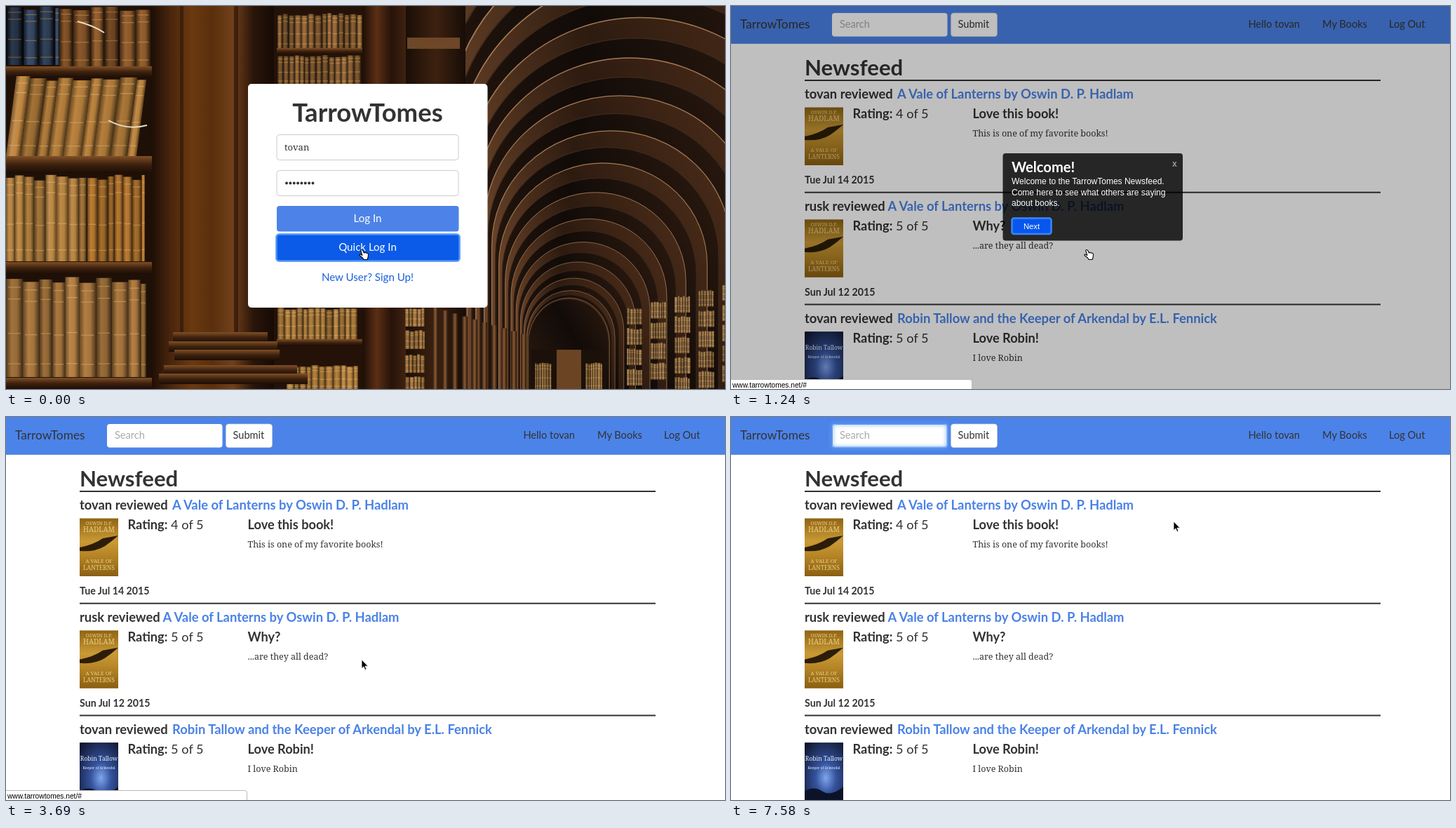
Write an HTML page with a canvas that moves like this. It is 1025 px wide and 546 px high and loops after 8 s.

```html
<!DOCTYPE html>
<html lang="en">
<head>
<meta charset="utf-8">
<title>TarrowTomes</title>
<style>
html, body { margin: 0; width: 100%; height: 100%; overflow: hidden; background: #fff; }
canvas, svg { position: absolute; inset: 0; width: 100%; height: 100%; display: block; }
svg { font-family: Lato, sans-serif; fill: #333; }
.serif { font: 12.5px "Noto Serif", serif; }
.sans { font: 12px "Liberation Sans", sans-serif; }
.nav { font-size: 14.6px; }
.button { font-size: 15.1px; text-anchor: middle; fill: #fff; }
.heading { font-size: 18.4px; font-weight: 700; }
.label { font-size: 18.2px; }
.bold { font-weight: 700; }
.link { fill: #4a82e6; }
.rule { stroke: #333; stroke-width: 2; }
.field { fill: #fff; stroke: #ccc; }
.cover { font-family: "Noto Serif", serif; text-anchor: middle; fill: #e9cf83; }

/* Timeline: 8 s loop, every change is a hard step */
.timed { animation: 8s step-end infinite; }
#library, #login { animation-name: login; }
#page { animation-name: page; }
#hello { animation-name: hello; }
#feed { animation-name: feed; }
#shade { animation-name: shade; }
#welcome { animation-name: welcome; }
#searchSpot { animation-name: searchSpot; }
#searchTip { animation-name: searchTip; }
#booksSpot { animation-name: booksSpot; }
#status { animation-name: status; }
#focus { animation-name: focus; }
#caret { animation-name: caret; }
#pointer { animation-name: move; }
#hand { animation-name: hand; }
#arrow { animation-name: arrow; }
#beam { animation-name: beam; }
@keyframes login { 0% { opacity: 1 } 1.875%, 100% { opacity: 0 } }
@keyframes page { 0% { opacity: 0 } 8.5%, 100% { opacity: 1 } }
@keyframes hello { 0% { opacity: 1 } 10.375%, 100% { opacity: 0 } }
@keyframes feed { 0% { opacity: 0 } 10.375%, 100% { opacity: 1 } }
@keyframes shade { 0% { opacity: 0 } 10.375% { opacity: .3 } 12.25% { opacity: .75 } 15.5% { opacity: 1 } 46.125%, 100% { opacity: 0 } }
@keyframes welcome { 0% { opacity: 0 } 12.25% { opacity: .6 } 15.5% { opacity: 1 } 29.375% { opacity: .6 } 31.25% { opacity: .1 } 33.125%, 100% { opacity: 0 } }
@keyframes searchSpot { 0% { opacity: 0 } 31.25% { opacity: 1 } 40.5%, 100% { opacity: 0 } }
@keyframes searchTip { 0% { opacity: 0 } 31.25% { opacity: .3 } 33.125% { opacity: .9 } 35% { opacity: 1 } 36.875% { opacity: .6 } 38.625% { opacity: .07 } 40.5%, 100% { opacity: 0 } }
@keyframes booksSpot { 0% { opacity: 0 } 40.5% { opacity: 1 } 46.125%, 100% { opacity: 0 } }
@keyframes status { 0% { opacity: 0 } 8.5% { opacity: 1 } 49.875%, 100% { opacity: 0 } }
@keyframes focus { 0% { opacity: 0 } 76.125% { opacity: .5 } 78%, 100% { opacity: 1 } }
@keyframes caret { 0% { opacity: 0 } 78% { opacity: 1 } 81.75% { opacity: 0 } 89.125% { opacity: 1 } 94.75%, 100% { opacity: 0 } }
@keyframes hand { 0% { opacity: 1 } 46.125%, 100% { opacity: 0 } }
@keyframes arrow { 0% { opacity: 0 } 46.125% { opacity: 1 } 72.5% { opacity: 0 } 79.875%, 100% { opacity: 1 } }
@keyframes beam { 0% { opacity: 0 } 72.5% { opacity: 1 } 79.875%, 100% { opacity: 0 } }
@keyframes move {
  0% { transform: translate(507px, 346px) }
  49.875% { transform: translate(530px, 345px) }
  51.75% { transform: translate(570px, 338px) }
  53.625% { transform: translate(605px, 328px) }
  55.5% { transform: translate(630px, 316px) }
  57.375% { transform: translate(640px, 308px) }
  59.5% { transform: translate(639px, 304px) }
  61.375% { transform: translate(637px, 302px) }
  65.125% { transform: translate(600px, 270px) }
  67% { transform: translate(500px, 190px) }
  68.875% { transform: translate(390px, 110px) }
  70.75% { transform: translate(310px, 62px) }
  72.5% { transform: translate(264px, 32px) }
  74.375% { transform: translate(258px, 28px) }
  79.875% { transform: translate(440px, 92px) }
  81.75%, 100% { transform: translate(631px, 149px) }
}
</style>
</head>
<body>
<canvas id="library" class="timed" width="1025" height="546"></canvas>
<svg viewBox="0 0 1025 546" preserveAspectRatio="none">
  <defs>
    <linearGradient id="gold" x2="0" y2="1">
      <stop stop-color="#8f6414"/><stop offset=".4" stop-color="#c99a35"/>
      <stop offset=".65" stop-color="#b58425"/><stop offset="1" stop-color="#8a5f12"/>
    </linearGradient>
    <radialGradient id="night" cx=".55" cy=".6" r=".75">
      <stop stop-color="#7fa6ee"/><stop offset=".35" stop-color="#35539d"/><stop offset="1" stop-color="#10162f"/>
    </radialGradient>
    <filter id="blur" x="-10%" y="-50%" width="120%" height="200%"><feGaussianBlur stdDeviation="2.5"/></filter>
  </defs>

  <g id="login" class="timed">
    <rect x="345" y="111" width="341.500" height="319" rx="5" fill="#fff"/>
    <text x="515.500" y="165" font-size="36.500" class="bold" text-anchor="middle">TarrowTomes</text>
    <rect class="field" x="386" y="183.500" width="259" height="36" rx="4"/>
    <rect class="field" x="386" y="234.500" width="259" height="36" rx="4"/>
    <text x="397" y="206" class="serif" style="font-size:13px">tovan</text>
    <path d="M400 252.500h37.600" stroke="#333" stroke-width="4" stroke-linecap="round" stroke-dasharray="0 5.350"/>
    <rect x="386" y="285" width="259.500" height="36.500" rx="4" fill="#4d83e8"/>
    <rect x="385.500" y="325.500" width="261" height="38" rx="4" fill="#0b5be8" stroke="#4f95f3" stroke-width="2.500"/>
    <text class="button" x="515.500" y="308">Log In</text>
    <text class="button" x="515.500" y="349">Quick Log In</text>
    <text class="button" x="515.500" y="392" style="fill:#1c61dc">New User? Sign Up!</text>
  </g>

  <g id="page" class="timed">
    <path d="M0 0H1025V53.500H0Z" fill="#4c83e8"/>
    <path d="M0 53.500H1025" stroke="#3c71d4" stroke-opacity=".6"/>
    <text x="13" y="32" font-size="17.300">TarrowTomes</text>
    <g id="searchBox">
      <rect x="144" y="10" width="164.500" height="33.500" rx="4" fill="#fff"/>
      <text x="155" y="31" class="nav" style="fill:#aaa">Search</text>
    </g>
    <g id="submit">
      <rect x="313.500" y="10" width="66" height="33.500" rx="4" fill="#fff" stroke="#ccc" stroke-width=".7"/>
      <text x="323.500" y="31" class="nav">Submit</text>
    </g>
    <g id="focus" class="timed">
      <rect x="144" y="10" width="164" height="33.500" rx="4" fill="none" stroke="#66a5f2" stroke-width="5" filter="url(#blur)" opacity=".5"/>
      <rect x="144.500" y="10.500" width="163.500" height="32.500" rx="4" fill="none" stroke="#5f9bee"/>
    </g>
    <rect id="caret" class="timed" x="155" y="18" width="1" height="17"/>
    <text id="hello" class="timed nav" x="811" y="31" text-anchor="end">Hello</text>
    <text id="myBooks" x="843" y="31" class="nav">My Books</text>
    <text x="938" y="31" class="nav">Log Out</text>
    <text x="105" y="99" font-size="31.200" class="bold">Newsfeed</text>
    <path class="rule" d="M105 106H926"/>
  </g>
  <g id="feed" class="timed"></g>

  <rect id="shade" class="timed" width="1025" height="546" fill="#000" fill-opacity=".25"/>
  <g id="searchSpot" class="timed">
    <rect x="135" y="1.500" width="181" height="50.500" rx="20" fill="#4b86ee"/>
    <use href="#searchBox"/>
    <use href="#submit" style="filter:brightness(.75)"/>
  </g>
  <g id="booksSpot" class="timed">
    <rect x="819" y="1.500" width="111" height="50.500" rx="20" fill="#4b86ee"/>
    <use href="#myBooks"/>
  </g>
  <g id="searchTip" class="timed"></g>
  <g id="welcome" class="timed"></g>

  <g id="status" class="timed">
    <path d="M-1 547V532.500H340.500q3 0 3 3V547Z" fill="#fff" stroke="#b9b9b9"/>
    <text x="2" y="543.500" class="sans" style="font-size:10.200px;fill:#000">www.tarrowtomes.net/#</text>
  </g>

  <g id="pointer" class="timed">
    <path id="hand" class="timed" fill="#fff" stroke="#000" stroke-width="1.100" stroke-linejoin="round"
      d="M-1 3.500Q-1.500 1.500 0 1.500Q1.200 1.500 1.800 2.800L3.400 6Q4.600 4.800 5.600 6Q7 5.200 7.800 6.600Q9.300 6.300 9.500 8L9.200 12L8 15.500H3L1.500 13L-3 9.600Q-3.400 7.800-1.500 8.200L.8 9.400Z"/>
    <path id="arrow" class="timed" fill="#000" stroke="#fff" stroke-width=".8" d="M0 0V12.500L2.900 9.900L4.900 14.500L6.900 13.600L4.900 9.200H9Z"/>
    <path id="beam" class="timed" fill="none" stroke="#222" stroke-width="1.100" d="M-3-6.500Q0-6.500 0-4Q0-6.500 3-6.500M0-4V4M-3 6.500Q0 6.500 0 4Q0 6.500 3 6.500M-1.500 2H1.500"/>
  </g>
</svg>

<script>
const byId = id => document.getElementById(id);

// Newsfeed entries
const goldCover = `
  <rect x="105" y="144.500" width="55" height="82.500" fill="url(#gold)"/>
  <path d="M105 186Q125 182 138 173L160 169Q150 178 141 184Q126 193 105 191Z" fill="#2c1d08"/>
  <g class="cover"><text x="132.500" y="154" font-size="7">OSWIN D.P.</text>
  <text x="132.500" y="164" font-size="10">HADLAM</text>
  <text x="132.500" y="208" font-size="7.500">A VALE OF</text>
  <text x="132.500" y="218" font-size="8.500">LANTERNS</text></g>`;
const blueCover = `
  <rect x="105" y="144.500" width="55" height="84" fill="url(#night)"/>
  <path d="M105 228V214Q118 206 130 214T160 208V228Z" fill="#0c1328"/>
  <g class="cover" style="fill:#e4ecfb"><text x="132.500" y="170" font-size="8.500">Robin Tallow</text>
  <text x="132.500" y="182" font-size="5">Keeper of Arkendal</text></g>`;
const vale = "A Vale of Lanterns by Oswin D. P. Hadlam";
const entries = [
  { user: "tovan", linkX: 237, book: vale, stars: 4, title: "Love this book!", body: "This is one of my favorite books!", date: "Tue Jul 14 2015", cover: goldCover },
  { user: "rusk", linkX: 223.5, book: vale, stars: 5, title: "Why?", body: "...are they all dead?", date: "Sun Jul 12 2015", cover: goldCover },
  { user: "tovan", linkX: 237, book: "Robin Tallow and the Keeper of Arkendal by E.L. Fennick", stars: 5, title: "Love Robin!", body: "I love Robin", date: "", cover: blueCover }
];
byId("feed").innerHTML = `<text class="nav" x="811" y="31" text-anchor="end">Hello tovan</text>
  <path d="M770 18h42v18h-42z" fill="none"/>` + entries.map((e, i) => `
  <g transform="translate(0 ${i * 159.8})">
    <text class="heading" x="105" y="132">${e.user} reviewed<tspan class="link" x="${e.linkX}">${e.book}</tspan></text>
    ${e.cover}
    <text class="label" x="173.500" y="160"><tspan class="bold">Rating:</tspan> ${e.stars} of 5</text>
    <text class="label bold" x="344.500" y="160">${e.title}</text>
    <text class="serif" x="344.500" y="186">${e.body}</text>
    <text class="bold" x="105" y="253" font-size="14.200">${e.date}</text>
    <path class="rule" d="M105 265.700H926"/>
  </g>`).join("");

// Tour popups
function tip(id, x, y, title, lines, extra = "") {
  const end = y + 44 + (lines.length - 1) * 15.5;
  byId(id).innerHTML = `
    <rect x="${x}" y="${y}" width="256.500" height="${end + 50 - y - 0.5}" rx="4" fill-opacity=".8" fill="#000"/>${extra}
    <g transform="translate(${x + 12.5} 0)" fill="#fff">
      <text y="${y + 27}" font-size="20.200" class="bold">${title}</text>
      ${lines.map((line, i) => `<text class="sans" y="${y + 44 + i * 15.5}">${line}</text>`).join("")}
      <text class="sans" x="229" y="${y + 18.5}" style="font-weight:700;fill:#999">x</text>
      <rect x=".5" y="${end + 17.5}" width="56" height="22.500" rx="3" fill="#0757ee" stroke="#3e85f5" stroke-width="2.500"/>
      <text class="sans" x="28.500" y="${end + 33}" text-anchor="middle" style="font-size:11.300px">Next</text>
    </g>`;
}
tip("welcome", 387.5, 210, "Welcome!",
  ["Welcome to the TarrowTomes Newsfeed.", "Come here to see what others are saying", "about books."]);
tip("searchTip", 144, 43, "Search",
  ["Search here to find new books to review", "and add to bookshelves. A seemingly", "endless supply of books is waiting", "for you to discover. Type a title", "and see what comes up."],
  `<path d="M144 49L130 57L144 65Z" fill-opacity=".8" fill="#000"/>`);

// Library backdrop
const ctx = byId("library").getContext("2d");
let seed = 11;
const rnd = (a = 0, b = 1) => a + (b - a) * ((seed = seed * 16807 % 2147483647) / 2147483647);
const box = (x, y, w, h, fill) => { ctx.fillStyle = fill; ctx.fillRect(x, y, w, h); };
function grad(x0, y0, x1, y1, ...colors) {
  const g = ctx.createLinearGradient(x0, y0, x1, y1);
  colors.forEach((c, i) => g.addColorStop(i / (colors.length - 1), c));
  return g;
}
function books(x0, x1, top, bottom, width, hue, sat, light, lean = 0) {
  for (let x = x0; x < x1 - 2;) {
    const w = Math.min(width * rnd(.7, 1.2), x1 - x), y = top + rnd(0, (bottom - top) * .08);
    const l = light + rnd(-7, 7), tone = d => `hsl(${hue} ${sat}% ${l + d}%)`;
    ctx.save();
    ctx.transform(1, 0, -lean, 1, lean * bottom, 0);
    box(x, y, w, bottom - y, grad(x, 0, x + w, 0, tone(-18), tone(4), tone(0), tone(-24)));
    for (const f of [.08, .2, .55, .86])
      box(x + w * .12, y + (bottom - y) * f, w * .75, 1.3, `hsl(36 50% ${l + 17}% / .65)`);
    ctx.restore();
    x += w;
  }
}
const board = (x, y, w, h) => box(x, y, w, h, grad(0, y, 0, y + h, "#805026", "#3d210e", "#1b0e06"));

function paintLibrary() {
  box(0, 0, 1025, 546, "#1d110a");
  // Vaulted hall, painted from the near arches inward
  for (let i = 0; i <= 30; i++) {
    const k = 1.45 * (1 - i / 30) ** 1.7;
    const cx = 802 + 110 * k, rx = 57 + 205 * k, cy = 480 - 250 * k, ry = 62 + 185 * k;
    const tone = i % 2 ? ["#6a4328", "#2d1b10", "#4b2c19"] : ["#23150d", "#110b08", "#2a190f"];
    ctx.beginPath();
    ctx.moveTo(cx - rx, 546);
    ctx.lineTo(cx - rx, cy);
    ctx.ellipse(cx, cy, rx, ry, 0, Math.PI, 2 * Math.PI);
    ctx.lineTo(cx + rx, 546);
    ctx.fillStyle = grad(cx - rx, cy, cx + rx * .8, cy - ry, ...tone);
    ctx.fill();
    ctx.strokeStyle = i % 2 ? "#a37a55" : "#3d291c";
    ctx.lineWidth = .6 + k;
    ctx.stroke();
  }
  box(748, 490, 108, 56, "#1c100a");
  box(785, 490, 35, 56, "#6b4424");
  books(754, 778, 508, 546, 4, 34, 40, 38);
  books(826, 850, 508, 546, 4, 34, 40, 38);
  for (let x = 885; x < 1025; x += 34) {
    const top = 430 - (x - 885) * .25;
    for (let y = top; y < 530; y += 29) books(x, x + 23, y, y + 24, 4, 32, 36, 38);
  }
  // Side columns and beam
  box(570, 0, 85, 546, grad(570, 0, 655, 0, "#1a0e07", "#3d2110", "#170d07"));
  box(572, 45, 75, 16, "#6d4728");
  for (let x = 608; x < 742; x += 14)
    box(x, 430 + (x - 608) * .3, 8, 120, grad(x, 0, x + 8, 0, "#2a180d", "#895a34", "#241309"));
  // Central case
  box(380, 0, 132, 546, "#241208");
  books(387, 508, 10, 60, 9, 30, 45, 34);
  board(386, 60, 122, 9);
  books(387, 508, 70, 112, 9, 30, 45, 34);
  books(387, 502, 430, 475, 9, 34, 48, 42);
  board(386, 475, 122, 10);
  books(400, 502, 512, 546, 10, 34, 50, 42);
  box(508, 0, 62, 546, grad(508, 0, 570, 0, "#1d0e06", "#5a2f14", "#27130a", "#3f2210"));
  for (const y of [430, 462, 496, 528]) books(569, 597, y, y + 27, 6, 32, 44, 40);
  // Wooden pillar and its plinth
  box(206, 0, 176, 546, grad(206, 0, 382, 0, "#1b0d05", "#4a260d", "#6a390f", "#5a2f0d", "#70401a", "#2a1509", "#160b05"));
  box(248, 0, 5, 470, "#29140899");
  box(325, 0, 6, 470, "#2a1408aa");
  [[238, 465, 135], [232, 478, 155], [240, 490, 150], [225, 512, 190], [218, 524, 212]].forEach(([x, y, w]) => board(x, y, w, 15));
  // Left case
  box(0, 0, 207, 546, "#1f1007");
  books(0, 76, 0, 84, 24, 216, 30, 25);
  books(76, 207, 0, 88, 23, 28, 52, 32);
  board(0, 86, 208, 16);
  books(0, 186, 100, 214, 23, 33, 50, 45, .13);
  board(0, 214, 208, 24);
  books(0, 116, 240, 364, 15, 34, 48, 46);
  books(116, 198, 240, 364, 13, 32, 58, 42);
  board(0, 365, 208, 17);
  books(0, 200, 386, 529, 22, 32, 46, 42);
  board(0, 530, 208, 16);
  ctx.strokeStyle = "#e8dcc2";
  ctx.lineWidth = 2;
  ctx.stroke(new Path2D("M102 22Q125 28 140 38M146 163Q172 178 201 170"));
}
paintLibrary();
</script>
</body>
</html>
```
